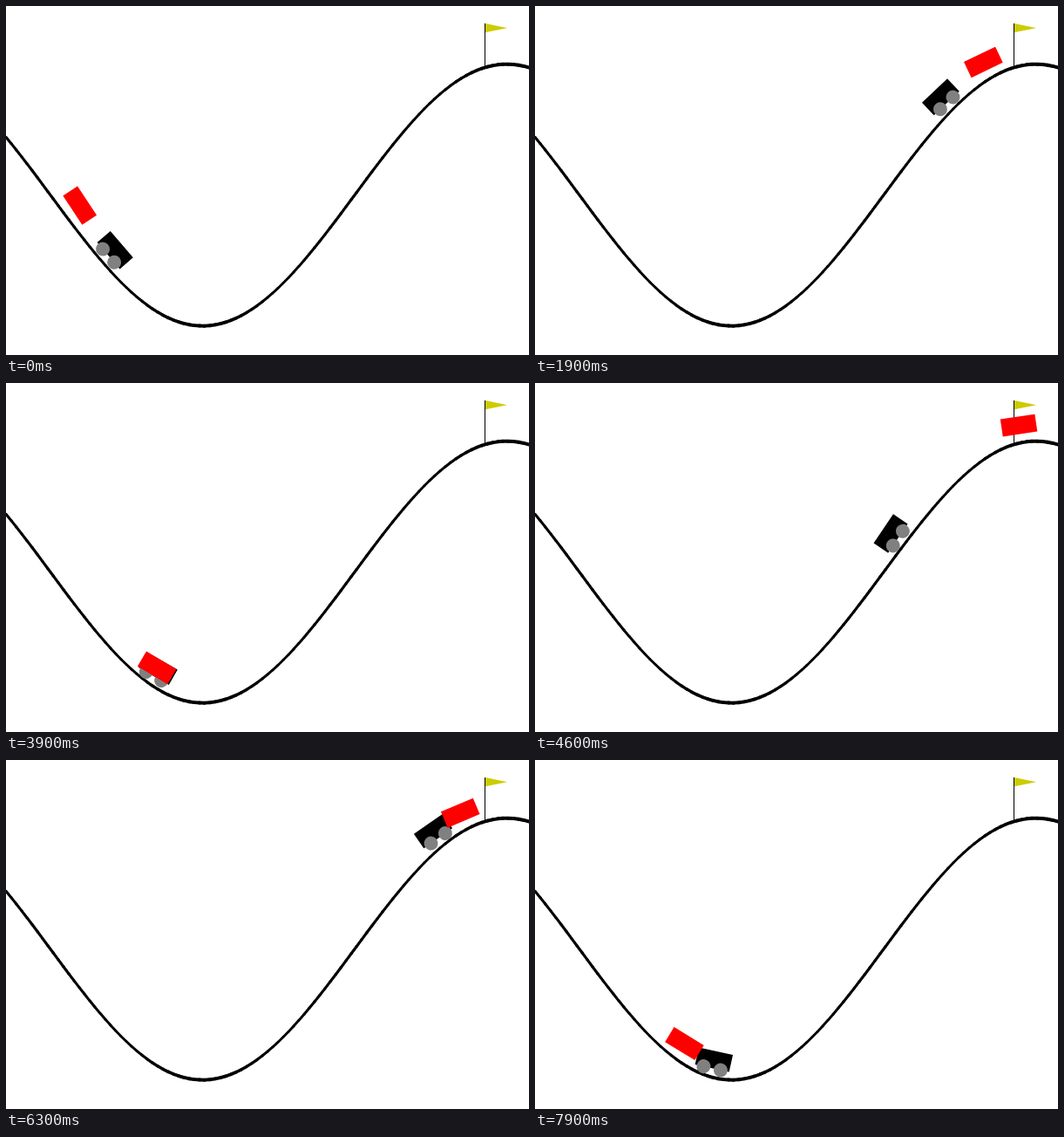
Animation of 600x400 px, one loop 8000 ms. Source, as an HTML page with a canvas:

```html
<!DOCTYPE html>
<html>
<head>
<meta charset="utf-8">
<style>
html, body { margin: 0; width: 100%; height: 100%; overflow: hidden; background: #fff; }
canvas { display: block; }
</style>
</head>
<body>
<canvas id="stage" width="600" height="400"></canvas>
<script>
const ctx = document.getElementById('stage').getContext('2d');
const LOOP = 8000, FRAME = 100, SCALE = 1000 / 3;
const toPos = px => px / SCALE - 1.2;
const toPx = pos => (pos + 1.2) * SCALE;
const groundY = px => 400 - SCALE * (0.55 + 0.45 * Math.sin(3 * toPos(px)));

// Each run: roll back from a start to a turning point, then drive up to the flag.
const runs = [
  { start: -600, from: 230, turn: 0, back: 110, end: 780, to: 549 },
  { start: 800, from: 242, turn: 1200, back: 160, end: 2100, to: 552 },
  { start: 2200, from: 230, turn: 2800, back: 95, end: 3500, to: 558 },
  { start: 3600, from: 205, turn: 4050, back: 151, end: 4900, to: 558 },
  { start: 5000, from: 234, turn: 5600, back: 118, end: 6400, to: 558 },
  { start: 6500, from: 225, turn: 6950, back: 143, end: 7800, to: 551 },
  { start: 7900, from: 201, turn: 8400, back: 150, end: 9300, to: 558 }
];

// Where the red box stands from each time on.
const goals = [
  [0, 68], [100, 38], [200, 531], [800, 163], [1300, 523], [2200, 163],
  [2600, 78], [2900, 73], [3000, 558], [3600, 163], [4100, 558],
  [5000, 161], [5500, 529], [6500, 161], [7000, 529], [7900, 161]
];

// Full thrust to the right against gravity, from rest.
function climb(back, to) {
  const path = [], dt = 0.1, last = toPos(to);
  let x = toPos(back), v = 0;
  while (x < last && path.length < 2000) {
    path.push(toPx(x));
    v += (0.0015 - 0.0025 * Math.cos(3 * x)) * dt;
    x += v * dt;
  }
  path.push(to);
  return path;
}
for (const run of runs) run.path = climb(run.back, run.to);

const latest = (list, test) => list.filter(test).pop();

function carX(t) {
  const r = latest(runs, run => run.start <= t);
  if (t < r.turn) {
    const p = (t - r.start) / (r.turn - r.start);
    return r.from + (r.back - r.from) * (1 - Math.cos(Math.PI * p)) / 2;
  }
  const p = Math.min(1, (t - r.turn) / (r.end - r.turn));
  return r.path[Math.round(p * (r.path.length - 1))];
}

function drawTrack() {
  ctx.strokeStyle = '#000';
  ctx.lineCap = 'round';
  for (let x = 0; x < 600; x += 6) {
    const y0 = groundY(x), y1 = groundY(x + 6), dy = Math.abs(y1 - y0);
    // width is measured along the nearer axis, so slopes look thinner
    ctx.lineWidth = 4 * Math.max(6, dy) / Math.hypot(6, dy);
    ctx.beginPath();
    ctx.moveTo(x, y0);
    ctx.lineTo(x + 6, y1);
    ctx.stroke();
  }
}

function drawBox(px, color, wheels) {
  ctx.save();
  ctx.translate(px, groundY(px));
  ctx.rotate(-Math.cos(3 * toPos(px)));
  ctx.fillStyle = color;
  ctx.fillRect(-20, -30, 40, 20);
  if (wheels) {
    ctx.fillStyle = '#808080';
    for (const x of [-10, 10]) {
      ctx.beginPath();
      ctx.arc(x, -10, 8, 0, 2 * Math.PI);
      ctx.fill();
    }
  }
  ctx.restore();
}

function drawFlag() {
  ctx.fillStyle = '#000';
  ctx.fillRect(549, 20, 1, 50);
  ctx.fillStyle = '#cccc00';
  ctx.beginPath();
  ctx.moveTo(550, 20);
  ctx.lineTo(550, 30.3);
  ctx.lineTo(575, 25.3);
  ctx.fill();
}

function draw(now) {
  const t = Math.floor(now % LOOP / FRAME) * FRAME;
  ctx.fillStyle = '#fff';
  ctx.fillRect(0, 0, 600, 400);
  drawTrack();
  drawBox(carX(t), '#000', true);
  drawFlag();
  drawBox(latest(goals, g => g[0] <= t)[1], '#f00');
}

const begin = performance.now();
function tick() {
  draw(performance.now() - begin);
  requestAnimationFrame(tick);
}
tick();
</script>
</body>
</html>
```
